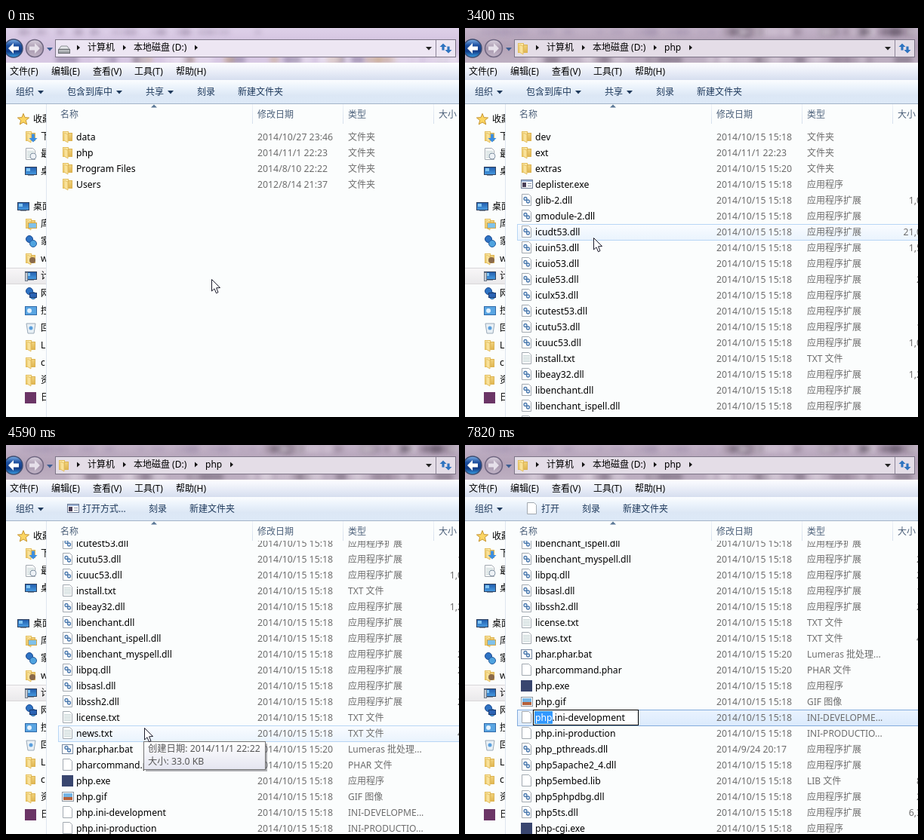
Recreate the animation shown at these times as an HTML page with a canvas. Size 600 px wide and 516 px high, loop 7.99 s.

```html
<!DOCTYPE html>
<html lang="zh-CN">
<head>
<meta charset="utf-8">
<style>
html, body { margin: 0; width: 100%; height: 100%; overflow: hidden; background: #fbfdfd; }
canvas { display: block; }
</style>
</head>
<body>
<canvas id="stage" width="600" height="516"></canvas>
<script>
const g = document.getElementById('stage').getContext('2d');
const STEP = 170, LOOP = 7990, ROW = 21, NOTCH = 3 * ROW;
const OPEN_FOLDER = 18, PICK_DLL = 23, PICK_INI = 35, HIDE_CURSOR = 40, RENAME = 45;
const FONT = '"Noto Sans", "Noto Sans CJK SC", sans-serif';

const TYPES = {
  dll: '应用程序扩展', exe: '应用程序', txt: 'TXT 文件', bat: 'Lumeras 批处理...', phar: 'PHAR 文件',
  gif: 'GIF 图像', lib: 'LIB 文件', 'ini-development': 'INI-DEVELOPME...', 'ini-production': 'INI-PRODUCTIO...'
};
// Each line: name | date (default below) | start of the size
const parse = lines => lines.trim().split('\n').map(line => {
  const [name, date, size = ''] = line.split('|');
  const ext = name.includes('.') ? name.split('.').pop() : '';
  return { name, ext, size, date: date || '2014/10/15 15:18', type: TYPES[ext] || '文件夹' };
});
const ROOT = parse(`
data|2014/10/27 23:46
php|2014/11/1 22:23
Program Files|2014/8/10 22:22
Users|2012/8/14 21:37`);
const PHP = parse(`
dev
ext|2014/11/1 22:23
extras|2014/10/15 15:20
deplister.exe
glib-2.dll||1,0
gmodule-2.dll
icudt53.dll||21,0
icuin53.dll||1,5
icuio53.dll
icule53.dll||2
iculx53.dll
icutest53.dll
icutu53.dll||1
icuuc53.dll||1,0
install.txt
libeay32.dll||1,2
libenchant.dll
libenchant_ispell.dll
libenchant_myspell.dll||2
libpq.dll||2
libsasl.dll||1
libssh2.dll||2
license.txt
news.txt||4
phar.phar.bat|2014/10/15 15:20
pharcommand.phar|2014/10/15 15:20
php.exe
php.gif
php.ini-development
php.ini-production
php_pthreads.dll|2014/9/24 20:17
php5apache2_4.dll
php5embed.lib||8
php5phpdbg.dll||2
php5ts.dll||6,3
php-cgi.exe`);

// Pointer path: tick, x, y, with straight moves between
const PATH = [
  [0, 272, 333], [2, 298, 398], [7, 122, 170], [18, 122, 170], [20, 170, 278], [23, 160, 331],
  [24, 158, 345], [27, 183, 375], [28, 183, 375], [32, 191, 383], [35, 192, 359], [37, 157, 359]
];
const ramp = (t, from, to) => Math.min(1, Math.max(0, (t - from) / (to - from)));

function pointer(tick) {
  let [, x, y] = PATH[0];
  for (let i = 1; i < PATH.length; i++) {
    const k = ramp(tick, PATH[i - 1][0], PATH[i][0]);
    x += (PATH[i][1] - x) * k;
    y += (PATH[i][2] - y) * k;
  }
  return [Math.round(x), Math.round(y)];
}
// Four wheel notches, a rest, then two more
function scrollAt(tick) {
  const notches = Math.round(4 * ramp(tick, 24, 27) + 2 * ramp(tick, 29, 31));
  return Math.max(0, notches * NOTCH - 7);
}
function selectedName(tick) {
  if (tick >= PICK_INI) return 'php.ini-development';
  if (tick >= PICK_DLL) return 'icule53.dll';
  return tick === OPEN_FOLDER - 1 ? 'php' : '';
}

function box(x, y, w, h, fill, line) {
  g.fillStyle = fill;
  g.fillRect(x, y, w, h);
  if (line) {
    g.strokeStyle = line;
    g.lineWidth = 1;
    g.strokeRect(x + .5, y + .5, w - 1, h - 1);
  }
}
function shade(y, h, ...stops) {
  const fill = g.createLinearGradient(0, y, 0, y + h);
  stops.forEach((c, i) => fill.addColorStop(i / (stops.length - 1), c));
  return fill;
}
function poly(points, fill, line, dx = 0, dy = 0) {
  g.beginPath();
  for (let i = 0; i < points.length; i += 2) g.lineTo(points[i] + dx, points[i + 1] + dy);
  g.closePath();
  g.fillStyle = fill;
  g.fill();
  if (line) {
    g.strokeStyle = line;
    g.lineWidth = 1;
    g.stroke();
  }
}
function disc(x, y, r, fill, line, width = 1) {
  g.beginPath();
  g.arc(x, y, r, 0, 7);
  g.fillStyle = fill;
  g.fill();
  if (line) {
    g.strokeStyle = line;
    g.lineWidth = width;
    g.stroke();
  }
}
// Centred arrow with a shaft, turned clockwise from pointing left
function arrow(x, y, size, turn, fill) {
  g.save();
  g.translate(x, y);
  g.rotate(turn * Math.PI / 2);
  g.scale(size, size);
  poly([-1, 0, 0, -1, 0, -.35, 1, -.35, 1, .35, 0, .35, 0, 1], fill);
  g.restore();
}
// Draws text and returns its width
function text(s, x, middle, color = '#000', size = 12) {
  g.font = `${size}px ${FONT}`;
  g.fillStyle = color;
  g.fillText(s, x, middle + 4);
  return Math.round(g.measureText(s).width);
}
const down = (x, y, c = '#1e395b') => poly([-4, -2, 4, -2, 0, 2.5], c, null, x, y);
const right = (x, y) => poly([-2, -3.5, 2, 0, -2, 3.5], '#111', null, x, y);

// Icons: x, y is the top left of a 16 px square
function folder(x, y) {
  box(x + 1, y + 1, 8, 13, shade(y, 14, '#fff1b8', '#f0cf70'), '#e3bd5c');
  box(x + 8, y + 3, 6, 11, shade(y, 14, '#f6dc8c', '#dfb44e'), '#dcb352');
  poly([3, 3, 8, 5, 8, 16, 3, 13], '#f9e29a', '#e5c062', x, y);
}
function page(x, y) {
  poly([1.5, .5, 10.5, .5, 13.5, 3.5, 13.5, 15.5, 1.5, 15.5], '#fff', '#a2a9b0', x, y);
}
function app(x, y) {
  box(x, y + 2, 16, 12, '#fff', '#6d7b94');
  box(x + 1, y + 3, 14, 2, '#9bb3d6');
  box(x + 2, y + 6, 5, 6, '#4a4058');
  box(x + 9, y + 7, 5, 1, '#8793a8');
  box(x + 9, y + 10, 5, 1, '#8793a8');
}
function gears(x, y) {
  for (const d of [0, 3.5]) disc(x + 6 + d, y + 6.5 + d, 2, '#e8f1fb', '#4b79ad', 1.3);
}
function monitor(x, y) {
  box(x, y + 2, 16, 11, shade(y, 13, '#174a9c', '#4aa0e6'), '#2f4260');
  box(x + 2, y + 4, 5, 4, '#82c5f2');
  box(x + 4, y + 13, 8, 1, '#8d9bab');
}
function globe(x, y) {
  disc(x + 6, y + 5, 4.5, '#2e73c4', '#1c4b91');
  disc(x + 11, y + 11, 4.5, '#4fa3df', '#245b9d');
}
function star(x, y) {
  const points = [];
  for (let i = 0; i < 10; i++) {
    const r = i % 2 ? 3.5 : 8, a = i * Math.PI / 5;
    points.push(8 + r * Math.sin(a), 8.5 - r * Math.cos(a));
  }
  poly(points, '#fbd562', '#c79631', x, y);
}
function picture(x, y) {
  box(x, y + 2, 16, 13, '#fff', '#8b95a0');
  box(x + 2, y + 4, 12, 5, '#74b4e4');
  box(x + 2, y + 9, 12, 4, '#b5603a');
}
function panel(x, y) {
  box(x, y + 2, 16, 12, '#5aa5e2', '#2f6aa8');
  disc(x + 6, y + 8, 3, '#e4f2fd');
}
function bin(x, y) {
  poly([2, 2, 14, 2, 12, 15, 4, 15], '#e9f0f5', '#9aaab8', x, y);
  disc(x + 8, y + 8, 2.5, '#5a9fdd');
}
function over(base, detail) {
  return (x, y) => { base(x, y); detail(x, y); };
}
const lines = (x, y) => { for (let i = 4; i < 14; i += 2) box(x + 3, y + i, 9, 1, '#c3d3d3'); };
const note = over(page, lines);
const library = over(page, gears);
const batch = over((x, y) => box(x, y + 2, 15, 13, '#fff', '#7989a0'), gears);
const square = color => (x, y) => box(x, y + 1, 15, 15, color);

function fileIcon({ name, ext }) {
  if (ext === 'exe') return name.startsWith('php') ? square('#39466f') : app;
  return { '': folder, gif: picture, bat: batch, dll: library, txt: note }[ext] || page;
}

function glass(inPhp) {
  box(0, 0, 600, 47, shade(0, 47, ...(inPhp ? ['#c3b3c8', '#b3a2b7', '#bfb1c3'] : ['#ddd0e8', '#d3c2df', '#d8c9e4'])));
  let seed = inPhp ? 50021 : 91193;
  const rnd = () => (seed = seed * 16807 % 2147483647) / 2147483647;
  const tints = inPhp ? ['#5b4c5f', '#e6dde8', '#d8ccda', '#8c7a8d'] : ['#6f6181', '#eee6f3', '#c9a675', '#f2ecf6'];
  g.save();
  g.filter = 'blur(3px)';
  g.globalAlpha = .5;
  for (let i = 0; i < 34; i++) {
    box(50 + rnd() * 550, 38, 8 + rnd() * 22, 8, tints[rnd() * 4 | 0]);
    box(15 + rnd() * 325, 3, 4 + rnd() * 9, 5, '#a695b2');
    if (inPhp) box(330 + rnd() * 270, 0, 14, 10, tints[rnd() * 4 | 0]);
  }
  g.restore();
}

function navigation(inPhp) {
  glass(inPhp);
  disc(10, 27, 12, shade(15, 24, '#7fb2e8', '#1d4f9f', '#123b86', '#3aa2e8'), '#3c4c70', 1.5);
  arrow(10, 27, 7, 0, '#fff');
  disc(38, 27, 11.5, shade(15, 24, '#dbd3e0', '#a797ad', '#c3b6c8'), '#6f6680', 1.5);
  arrow(38, 27, 7, 2, '#e6e0ea');
  down(58, 28, '#3a5d92');

  box(65, 15, 531, 24, inPhp ? '#e4dde7' : '#ede6f3', '#7d7587');
  box(569, 16, 1, 22, '#8d8498');
  if (inPhp) folder(69, 19);
  else {
    poly([2, 7, 5, 3, 13, 3, 16, 7], '#e7e9eb', '#8a8e92', 68, 21);
    box(69, 28, 16, 6, shade(28, 6, '#d5d8db', '#85898d'), '#6b6f73');
  }
  right(96, 26);
  let x = 108;
  for (const crumb of ['计算机', '本地磁盘 (D:)', 'php'].slice(0, inPhp ? 3 : 2)) {
    x += text(crumb, x, 26) + 25;
    right(x - 12, 26);
  }
  down(560, 27, '#222');
  arrow(579, 25, 4.5, 1, '#2d73c0');
  arrow(586, 29, 4.5, 3, '#2d73c0');
}

function bars(tick) {
  box(0, 46, 600, 23, shade(46, 23, '#fdfdff', '#eaeef8', '#d6deef'));
  ['文件(F)', '编辑(E)', '查看(V)', '工具(T)', '帮助(H)'].forEach((s, i) => text(s, 5 + 55 * i, 58));

  box(0, 69, 600, 31, shade(69, 31, '#fbfdff', '#eaf2fb', '#dce7f5', '#dde9f7'));
  box(0, 100, 600, 1, '#a4b4c8');
  let x = 13;
  const button = (label, { menu, icon } = {}) => {
    if (icon) {
      icon(x, 76);
      x += 20;
    }
    x += text(label, x, 85, '#1e395b') + 30;
    if (menu) {
      down(x - 21, 85);
      x += 14;
    }
  };
  button('组织', { menu: true });
  if (tick >= PICK_INI) button('打开', { icon: page });
  else if (tick >= PICK_DLL) button('打开方式...', { icon: app });
  else {
    button('包含到库中', { menu: true });
    button('共享', { menu: true });
  }
  button('刻录');
  button('新建文件夹');
}

const SIDE = [
  ['收藏夹', star],
  ['下载', over(folder, (x, y) => arrow(x + 11, y + 10, 5.5, 3, '#3b8de0'))],
  ['最近', over(note, (x, y) => disc(x + 11, y + 11, 4, '#eef2f6', '#8797a8'))],
  ['桌面', monitor],
  null,
  ['桌面', monitor],
  ['库', over(folder, (x, y) => box(x + 4, y + 6, 12, 8, '#7fc1ea', '#d2a646'))],
  ['家庭组', globe],
  ['w', over(folder, (x, y) => disc(x + 10, y + 10, 4, '#8a6a4b'))],
  ['计算机', over(monitor, (x, y) => box(x, y + 3, 4, 12, '#c5ccd6', '#737e8c'))],
  ['网络', over(globe, (x, y) => box(x + 6, y + 7, 10, 7, '#2b63b4', '#1d3c70'))],
  ['控制面板', panel],
  ['回收站', bin],
  ['L', folder],
  ['c', folder],
  ['资料', folder],
  ['日', square('#6b3566')]
];
function sidebar() {
  g.save();
  g.beginPath();
  g.rect(0, 101, 53, 415);
  g.clip();
  box(-2, 318, 60, 22, shade(318, 22, '#f9f7f8', '#e9e8ea'), '#d9d7d9');
  SIDE.forEach((item, i) => {
    if (!item) return;
    const [name, icon] = item, y = 121 + 23 * i + (i > 4 ? 1 : 0);
    const indent = SIDE[i - 1] ? 10 : 0;
    icon(15 + indent, y - 8);
    text(name, 36 + indent, y);
  });
  g.restore();
  box(53, 101, 1, 415, '#dfe6ef');
}

function header() {
  [['名称', 72], ['修改日期', 333], ['类型', 453], ['大小', 573]].forEach(([s, x]) => {
    text(s, x, 115, '#4c607a');
    if (x > 72) box(x - 7, 101, 1, 26, shade(101, 26, '#eef2f8', '#d5dfec'));
  });
  poly([192, 105.5, 196, 101.5, 200, 105.5], '#5a7796');
}

function list(files, tick, pointerY) {
  const scroll = scrollAt(tick), selected = selectedName(tick);
  g.save();
  g.beginPath();
  g.rect(54, 127, 546, 389);
  g.clip();
  files.forEach((file, i) => {
    const y = 134 + ROW * i - scroll, mid = y + 11;
    const hover = tick < HIDE_CURSOR && pointerY > y && pointerY <= y + ROW;
    if (file.name === selected) {
      box(69, y, 540, 22, shade(y, 22, '#dcebfd', '#c1dbfa'), '#84acdd');
      const fade = .4 * ramp(tick, RENAME - 2, RENAME + 1);
      box(70, y + 1, 538, 20, `rgba(255,255,255,${fade})`);
    } else if (hover) box(69, y, 540, 22, shade(y, 22, '#fafcff', '#e9f3fd'), '#b8d6f5');
    fileIcon(file)(74, y + 2);
    text(file.name, 93, mid, '#000', 12.2);
    text(file.date, 333, mid, '#6d6d6d', 12.3);
    text(file.type, 453, mid, '#6d6d6d');
    g.textAlign = 'right';
    text(file.size, 605, mid, '#6d6d6d', 12.3);
    g.textAlign = 'left';
  });
  g.restore();
}

function tooltip() {
  box(185, 396, 161, 37, 'rgba(60,60,70,.4)');
  box(182, 393, 162, 38, shade(393, 38, '#ffffff', '#e4e5f0'), '#767676');
  text('创建日期: 2014/11/1 22:22', 188, 403, '#575757', 12.3);
  text('大小: 33.0 KB', 188, 420, '#575757', 12.3);
}

function rename() {
  box(90, 351, 140, 21, '#fff', '#000');
  text('php.ini-development', 93, 362, '#000', 12.2);
  box(92, 353, 24, 17, '#3399ff');
  text('php', 93, 362, '#fff', 12.2);
}

function draw(tick) {
  const inPhp = tick >= OPEN_FOLDER, [x, y] = pointer(tick);
  box(0, 0, 600, 516, '#fbfdfd');
  navigation(inPhp);
  bars(tick);
  sidebar();
  header();
  list(inPhp ? PHP : ROOT, tick, y);
  if (tick === 27 || tick === 28) tooltip();
  if (tick >= RENAME) rename();
  if (tick < HIDE_CURSOR) {
    poly([.5, .5, .5, 16, 4, 12.8, 6.5, 18.8, 9, 17.6, 6.6, 11.8, 11.5, 11.5], '#fff', '#1c1c2c', x, y);
  }
}

let shown = -1;
function play(now) {
  const tick = Math.floor(now % LOOP / STEP);
  if (tick !== shown) draw(shown = tick);
  requestAnimationFrame(play);
}
play(0);
</script>
</body>
</html>
```
